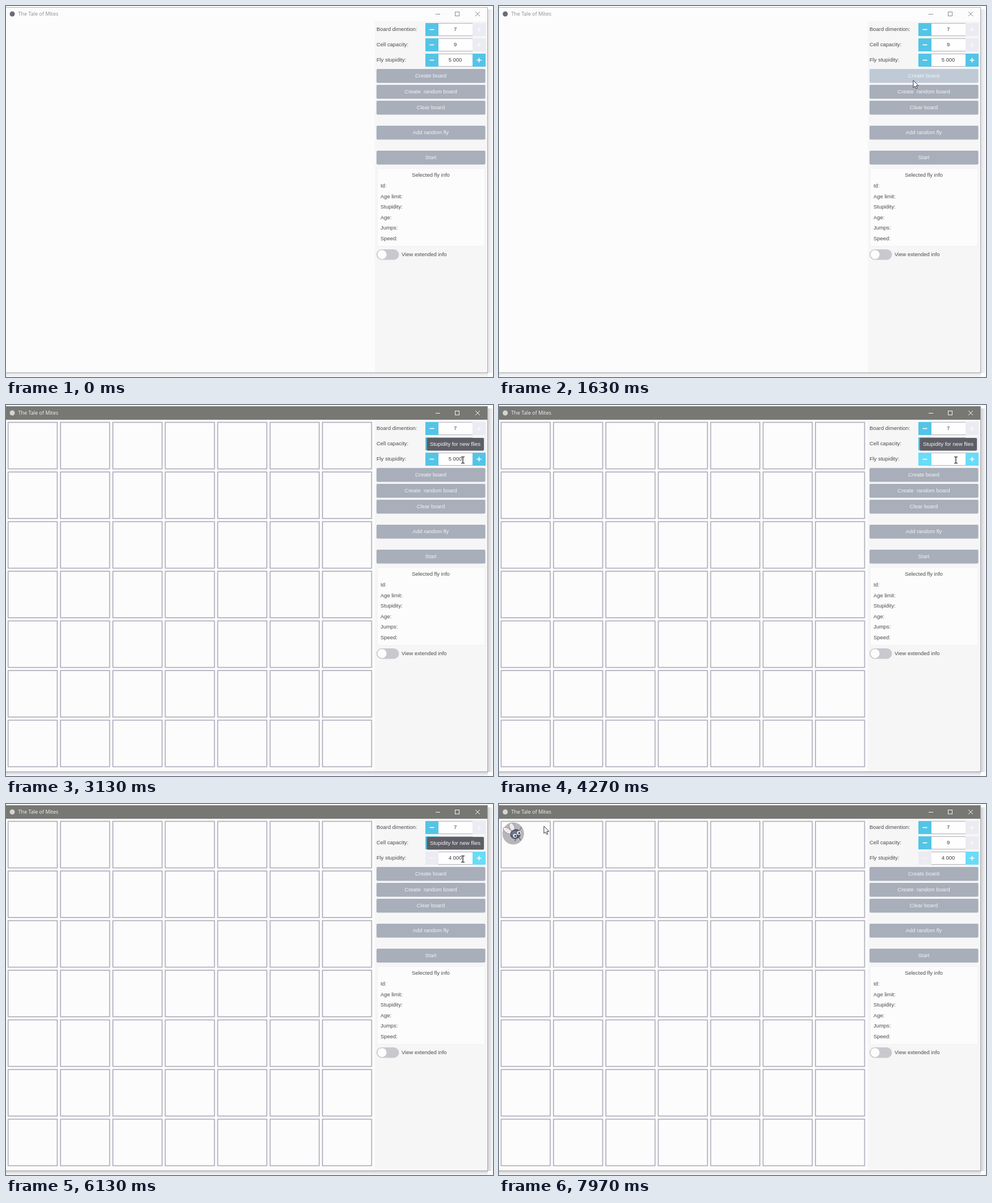
These frames come from a looping animation (857 by 654 pixels, 8 s). An HTML page with a canvas:

```html
<!DOCTYPE html>
<html lang="en">
<head>
<meta charset="utf-8">
<title>Fly board</title>
<style>
html, body { margin: 0; width: 100%; height: 100%; overflow: hidden; background: #fff; }
canvas { display: block; }
</style>
</head>
<body>
<canvas id="stage" width="857" height="654"></canvas>
<script>
const ctx = document.getElementById('stage').getContext('2d');
const LOOP = 8000;
const UI_FONT = '9.45px "Liberation Sans", Arial, sans-serif';
const TITLE_FONT = '9px "Open Sans", sans-serif';

// Moments of the scripted session, in ms
const FOCUS_WINDOW = 1770, SHOW_BOARD = 1840, TIP_ON = 2900, FOCUS_FIELD = 3700,
  CLEAR_FIELD = 4030, COMMIT = 6030, TIP_OFF = 6420, SHOW_FLY = 7970;

// time, x, y of the pointer
const PATH = [
  [500, 870, 42], [800, 838, 58], [1330, 728, 104], [1500, 729, 129], [1630, 729, 131],
  [1860, 729, 131], [2100, 792.5, 106.5], [2200, 795, 104], [2600, 800, 101], [3100, 804, 97],
  [6370, 804, 97], [6460, 778, 122], [6570, 722, 154], [6630, 695, 177], [6690, 560, 188],
  [6750, 230, 130], [6800, 20, 72], [7300, 20, 72], [7770, 79, 39]
];
const BUTTONS = [
  ['Create board', 111], ['Create  random board', 139], ['Clear board', 167],
  ['Add random fly', 211], ['Start', 255]
];
const INFO = ['Id:', 'Age limit:', 'Stupidity:', 'Age:', 'Jumps:', 'Speed:'];

function pointer(t) {
  if (t <= PATH[0][0]) return PATH[0].slice(1);
  for (let i = 1; i < PATH.length; i++) {
    const [t0, x0, y0] = PATH[i - 1], [t1, x1, y1] = PATH[i];
    if (t <= t1) {
      const k = (t - t0) / (t1 - t0);
      return [x0 + (x1 - x0) * k, y0 + (y1 - y0) * k];
    }
  }
  return PATH[PATH.length - 1].slice(1);
}

function rect(x, y, w, h, fill) {
  ctx.fillStyle = fill;
  ctx.fillRect(x, y, w, h);
}

function round(x, y, w, h, r, fill) {
  ctx.fillStyle = fill;
  ctx.beginPath();
  ctx.roundRect(x, y, w, h, r);
  ctx.fill();
}

function ellipse(x, y, rx, ry, angle, fill) {
  ctx.fillStyle = fill;
  ctx.beginPath();
  ctx.ellipse(x, y, rx, ry, angle, 0, 7);
  ctx.fill();
}

function line(points, color, width = 1) {
  ctx.strokeStyle = color;
  ctx.lineWidth = width;
  ctx.beginPath();
  points.forEach(([x, y]) => ctx.lineTo(x, y));
  ctx.stroke();
}

function text(str, x, y, color = '#4c4c4c', align = 'left', font = UI_FONT) {
  ctx.font = font;
  ctx.fillStyle = color;
  ctx.textAlign = align;
  ctx.textBaseline = 'middle';
  ctx.fillText(str, x, y + 0.5);
}

function drawWindow(focused) {
  rect(0, 0, 857, 654, '#fdfdfd');
  const shade = focused ? '#d0d0d4' : '#e2e2e6';
  const right = ctx.createLinearGradient(848, 0, 857, 0);
  const below = ctx.createLinearGradient(0, 647, 0, 654);
  for (const g of [right, below]) {
    g.addColorStop(0, shade);
    g.addColorStop(1, '#fafafa');
  }
  rect(848, 6, 9, 641, right);
  rect(0, 647, 848, 7, below);
  rect(0, 2, 848, 645, '#fcfcfc');
  rect(649, 27, 198, 619, '#f6f6f7');
  rect(0, 2, 848, 24, focused ? '#777774' : '#fcfcfc');
  rect(0, 2, 848, 1, focused ? '#8a8a88' : '#b4b4bc');
  rect(847, 2, 1, 645, '#a9a9b4');
  rect(0, 646, 848, 1, '#a4a4aa');

  const ink = focused ? '#f4f4f4' : '#8c8c8c';
  ellipse(11, 14, 4.5, 4.5, 0, focused ? '#d4d4d4' : '#6c6c74');
  text('The Tale of Mites', 21.5, 14, ink, 'left', TITLE_FONT);
  line([[756, 14.5], [764, 14.5]], ink);
  ctx.strokeRect(790.5, 10.5, 7, 7);
  line([[826, 10], [834, 18]], ink);
  line([[834, 10], [826, 18]], ink);
}

function drawBoard() {
  ctx.strokeStyle = '#b0b0be';
  ctx.lineWidth = 1.7;
  for (let row = 0; row < 7; row++)
    for (let col = 0; col < 7; col++)
      ctx.strokeRect(3.7 + col * 92.2, 30.6 + row * 87.5, 86.5, 82);
}

function stepper(x, y, sign, enabled, focused) {
  rect(x, y, 23, 23, !enabled ? '#ebebf2' : focused ? '#68dcf8' : '#54c4e6');
  const ink = enabled ? '#fff' : '#f7f7fa', cx = x + 11.5, cy = y + 11.5;
  line([[cx - 4, cy], [cx + 4, cy]], ink, 1.6);
  if (sign === '+') line([[cx, cy - 4], [cx, cy + 4]], ink, 1.6);
}

function spinner(label, value, y, minus, plus, focused) {
  text(label, 652, y);
  rect(761, y - 11, 60, 23, '#b2b2b8');
  rect(761, y - 10, 60, 21, '#fefefe');
  stepper(738, y - 11, '-', minus, focused);
  stepper(821, y - 11, '+', plus, focused);
  text(value, 790.5, y, '#3c3c3c', 'center');
}

function stupidityText(t) {
  if (t < CLEAR_FIELD) return '5 000';
  if (t < 5770) return '';
  if (t < 5800) return '4';
  if (t < 5830) return '400';
  return t < COMMIT ? '4000' : '4 000';
}

function drawField(t) {
  const selected = t >= FOCUS_FIELD && t < CLEAR_FIELD;
  const value = stupidityText(t);
  spinner('Fly stupidity:', value, 95, t < COMMIT, true, t >= FOCUS_FIELD);
  if (selected) {
    rect(778, 88, 25, 14, '#54c4e6');
    text(value, 790.5, 95, '#fff', 'center');
  }
  const caretOn = t >= CLEAR_FIELD && t < COMMIT && !(t >= 4270 && t < 4370)
    || t >= 7130 && t < 7630;
  if (caretOn) rect(Math.round(790.5 + ctx.measureText(value).width / 2), 89, 1, 12, '#555');
}

function drawPanel(t) {
  spinner('Board dimention:', '7', 41, true, false, false);
  spinner('Cell capacity:', '9', 68, true, false, false);
  drawField(t);

  const [hx, hy] = pointer(t - 60);
  for (const [label, y] of BUTTONS) {
    const hover = hx > 652 && hx < 843 && hy >= y && hy < y + 24;
    round(652, y, 191.5, 24.5, 2, hover ? '#bfcad6' : '#a8afba');
    text(label, 747.5, y + 12, '#f2f3f6', 'center');
  }

  rect(653, 286, 190, 138, '#f2f2f3');
  rect(654, 287, 188, 136, '#fcfcfc');
  text('Selected fly info', 747.5, 298, '#4c4c4c', 'center');
  INFO.forEach((label, i) => text(label, 659, 316.8 + i * 18.6));

  round(652, 429, 39.5, 18.5, 9.2, '#c8c8ce');
  ellipse(661.7, 438.2, 8, 8, 0, '#fdfdfd');
  text('View extended info', 696, 438);

  if (t >= TIP_ON && t < TIP_OFF) {
    round(740.5, 58, 100.5, 22.5, 2, '#5e5e66');
    text('Stupidity for new flies', 790.5, 69, '#f4f4f4', 'center');
  }
}

function drawFly() {
  ellipse(25, 52, 19, 19.5, 0, '#b6b6ba');
  line([[30, 60], [28, 66]], '#5c6270', 1.2);
  line([[35, 58], [38, 64]], '#5c6270', 1.2);
  line([[36, 46], [40, 41]], '#5c6270', 1.2);
  for (const [x, y, rx, angle] of [[15, 47, 9, 0.55], [23, 41, 8.5, 1.2]]) {
    ellipse(x, y, rx, 4.6, angle, '#8f8a92');
    ellipse(x, y, rx - 0.8, 3.8, angle, '#f1e9ea');
  }
  ellipse(29, 53, 9.5, 8.5, -0.4, '#4c566a');
  ellipse(27, 52, 6, 5, -0.4, '#69758b');
  for (const [x, y] of [[28, 56], [35, 51]]) {
    ellipse(x, y, 3.4, 3.6, 0, '#e6e8ee');
    ellipse(x + 0.6, y + 0.3, 1.5, 1.7, 0, '#2c3038');
  }
}

function drawPointer(t) {
  const [x, y] = pointer(t);
  const overField = x > 761 && x < 821 &&
    [30, 57, 84].some(top => y >= top && y < top + 22);
  if (overField) {
    line([[x, y - 5], [x, y + 5]], '#222', 1.3);
    for (const end of [-5.5, 5.5]) line([[x - 3, y + end], [x + 3, y + end]], '#222', 1.1);
    return;
  }
  ctx.save();
  ctx.translate(x, y);
  ctx.beginPath();
  [[0, 0], [0, 13], [3, 10.3], [5, 14.7], [7, 13.8], [5.1, 9.5], [9, 9.2]]
    .forEach(([px, py]) => ctx.lineTo(px, py));
  ctx.closePath();
  ctx.fillStyle = '#fff';
  ctx.fill();
  ctx.strokeStyle = '#33333a';
  ctx.lineWidth = 1;
  ctx.stroke();
  ctx.restore();
}

function frame(now) {
  const t = now % LOOP;
  drawWindow(t >= FOCUS_WINDOW);
  if (t >= SHOW_BOARD) drawBoard();
  if (t >= SHOW_FLY) drawFly();
  drawPanel(t);
  drawPointer(t);
  requestAnimationFrame(frame);
}
requestAnimationFrame(frame);
</script>
</body>
</html>
```
